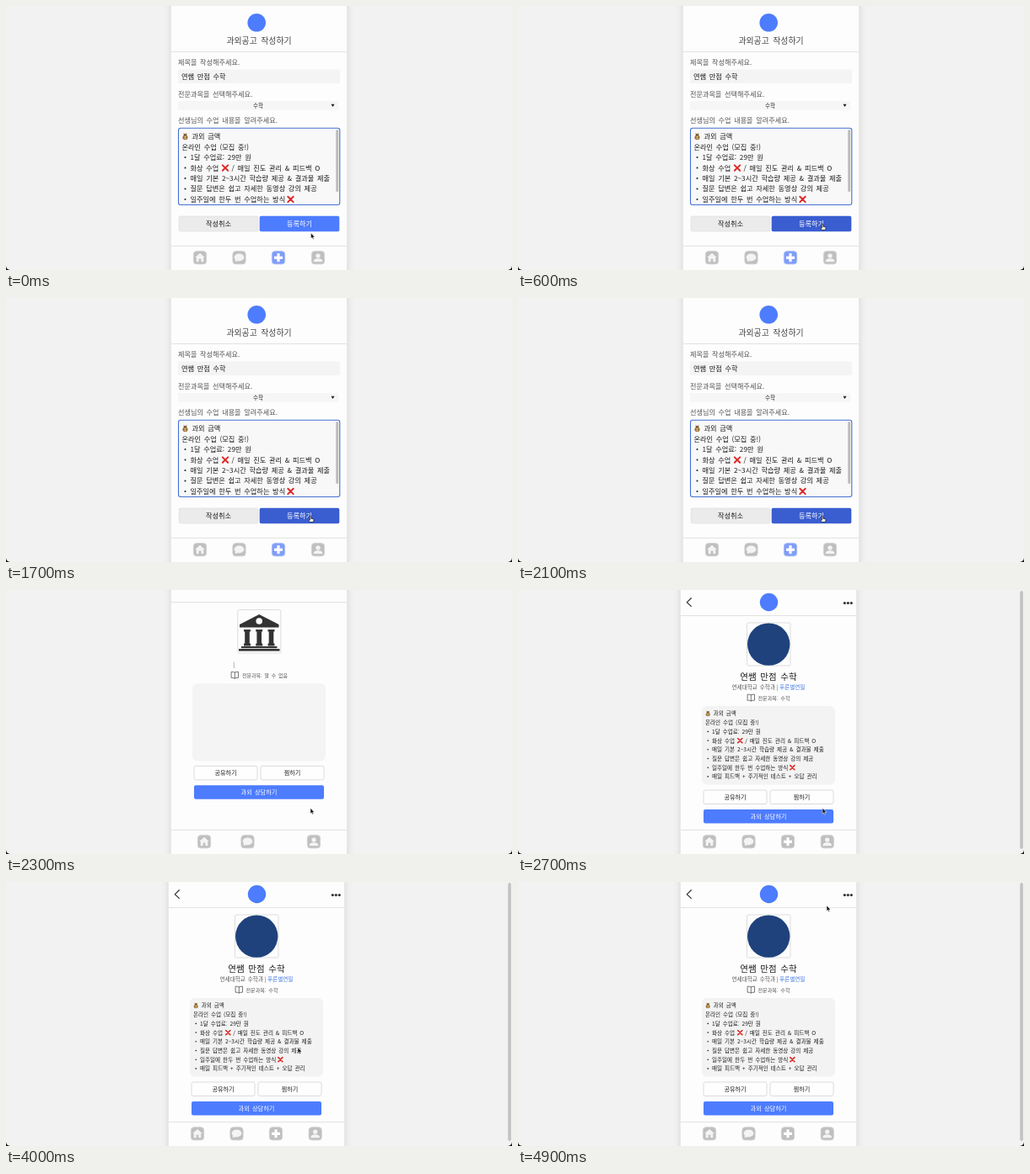
An HTML page for the animation above (5 s loop, 600 px wide and 314 px high).

```html
<!DOCTYPE html>
<html lang="ko">
<head>
<meta charset="utf-8">
<title>과외공고</title>
<style>
  html, body { margin: 0; width: 100%; height: 100%; overflow: hidden; background: #111; }
  svg { display: block; width: 600px; height: 314px; border-radius: 0 0 5px 5px; background: #f2f2f2; }
  text { font-family: "Noto Sans CJK KR", "Noto Sans CJK", "Noto Sans CJK JP", sans-serif; white-space: pre; word-spacing: .17em; }
  .panel { fill: #fdfdfd; filter: drop-shadow(0 0 4px rgba(0, 0, 0, .13)); }
</style>
</head>
<body>
<svg id="stage" viewBox="0 0 600 314" xmlns="http://www.w3.org/2000/svg"></svg>
<script>
const LOOP = 5000, HOVER_AT = 200, BLANK_AT = 2200, LOADED_AT = 2600;
const BLUE = '#4d7cfe', BLUE_HOVER = '#3a5dd0', INK = '#1c1c1c', GREY = '#555';

// Cursor tip: time, x, y
const PATH = [
  [0, 361.5, 270], [199, 361.5, 270], [200, 361, 259.5], [3000, 361, 259.5],
  [3700, 346, 197], [4100, 346, 197], [4600, 379, 204], [4700, 379, 204],
  [4800, 374, 100], [4900, 366, 28], [5000, 366, 28]
];

const rect = (x, y, w, h, fill, r = 0, stroke = 'none', sw = 1) =>
  `<rect x="${x}" y="${y}" width="${w}" height="${h}" rx="${r}" fill="${fill}" stroke="${stroke}" stroke-width="${sw}"/>`;
const path = (d, fill, stroke = 'none', sw = 1) =>
  `<path d="${d}" fill="${fill}" stroke="${stroke}" stroke-width="${sw}" stroke-linejoin="round" stroke-linecap="round"/>`;
const circle = (x, y, r, fill) => `<circle cx="${x}" cy="${y}" r="${r}" fill="${fill}"/>`;
const at = (x, y, body, scale = 1) => `<g transform="translate(${x} ${y}) scale(${scale})">${body}</g>`;
const group = (id, body) => `<g id="${id}">${body}</g>`;

// y is the middle of the line
function text(x, y, size, str, fill = INK, anchor = 'start', weight = fill === INK ? 500 : 400) {
  const safe = str.replace('&', '&amp;');
  return `<text x="${x}" y="${y + size * 0.37}" font-size="${size}" fill="${fill}" text-anchor="${anchor}" font-weight="${weight}">${safe}</text>`;
}
const mid = (x, y, size, str, fill, weight) => text(x, y, size, str, fill, 'middle', weight);
const rule = (x, y) => rect(x, y, 208, 1, '#e2e2e2');
const panel = x => `<rect class="panel" x="${x}" y="-8" width="208.3" height="330"/>`;

function button(x, y, w, h, label, fill, color, size, stroke = 'none') {
  return rect(x, y, w, h, fill, 2, stroke, 0.8) + mid(x + w / 2, y + h / 2, size, label, color);
}

const cross = path('M-3.2-3.2L3.2 3.2M3.2-3.2L-3.2 3.2', 'none', '#dd2a26', 2);
const moneyBag =
  path('M-1.4-1.6C-4 .2-3.8 4 0 4S4 .2 1.4-1.6L2.3-4L0-3.3L-2.3-4Z', '#937044') +
  rect(-1.7, -2.1, 3.4, 0.9, '#5c4222') +
  path('M1-.2Q-1.2-.8-1 .6Q1.4 1 1 2.2Q-.4 3-1.2 2.2M0-.8V3.2', 'none', '#e6c465', 0.6);
const book = path('M0-3.2Q-1.4-4-4.2-3.8V3.2Q-1.4 3 0 4Q1.4 3 4.2 3.2V-3.8Q1.4-4 0-3.2V4', 'none', '#555', 0.8);

const PALE = '#f4f4f4';
const glyphs = {
  home: path('M0-5.4L5.8-.3H4.3V5H1.3V1.5H-1.3V5H-4.3V-.3H-5.8Z', PALE),
  chat: '<ellipse cx="0" cy="-.4" rx="5.8" ry="4.5" fill="#f4f4f4"/>' + path('M-4.4 1.5L-4.8 5L-1 3.6Z', PALE),
  plus: path('M-1.6-5H1.6V-1.6H5V1.6H1.6V5H-1.6V1.6H-5V-1.6H-1.6Z', '#fff'),
  person: circle(0, -2.2, 2.7, PALE) + path('M-5.4 5Q-5.4 1 0 1T5.4 5Z', PALE)
};
const navIcon = (name, x, fill = '#bfbfbf', edge = '#d2d2d2') =>
  at(x, 299.3, rect(-7.6, -7.6, 15.2, 15.2, fill, 3.5, edge) + glyphs[name]);
const nav = (x0, items) => rule(x0, 285) + items.map(i => navIcon(...i)).join('');

// Lesson notes; the same block is set at two sizes
function notes(x, y, size, pitch, indent, count) {
  const k = size / 8.2;
  const bullets = [
    '1달 수업료: 29만 원', null,
    '매일 기본 2~3시간 학습량 제공 & 결과물 제출',
    '질문 답변은 쉽고 자세한 동영상 강의 제공',
    '일주일에 한두 번 수업하는 방식',
    '매일 피드백 + 주기적인 테스트 + 오답 관리'
  ].slice(0, count);
  const left = x + indent;
  let out = at(x + 4 * k, y, moneyBag, k) + text(x + 12 * k, y, size, '과외 금액') +
    text(x, y + pitch, size, '온라인 수업 (모집 중!)');
  bullets.forEach((line, i) => {
    const cy = y + pitch * (i + 2);
    out += circle(x + 4 * k, cy, k, INK);
    if (line) out += text(left, cy, size, line);
    else out += text(left, cy, size, '화상 수업') + at(left + 41.5 * k, cy, cross, k) +
      text(left + 49 * k, cy, size, '/ 매일 진도 관리 & 피드백 O');
    if (i === 4) out += at(left + 119 * k, cy, cross, k);
  });
  return out;
}

function form() {
  return panel(195.8) + circle(297.2, 19.8, 10.8, BLUE) +
    mid(300, 41, 9.9, '과외공고 작성하기', '#444') + rule(196, 54) +
    text(204, 67.2, 8.15, '제목을 작성해주세요.', GREY) +
    rect(204, 75.5, 192, 16.5, '#f4f4f4', 1.5) + text(208, 84, 8.2, '연쌤 만점 수학') +
    text(204, 104.5, 8.15, '전문과목을 선택해주세요.', GREY) +
    rect(204, 113, 190, 10.5, '#f6f6f6', 1) + mid(299, 118.2, 6.5, '수학') +
    path('M385.5 116.8H389.5L387.5 120Z', INK) +
    text(204, 136, 8.15, '선생님의 수업 내용을 알려주세요.', GREY) +
    rect(204.5, 145.2, 191.3, 91.3, '#f8f8f8', 2.5, '#4471d2', 1.1) +
    rect(391.2, 147, 3, 74, '#bdbdbd', 1.5) +
    notes(208.5, 155.2, 8.2, 12.45, 10, 5) +
    button(205, 250, 94, 18, '작성취소', '#ebebeb', INK, 8.2, '#e2e2e2') +
    group('submit', button(300.7, 249.7, 94.6, 18.5, '등록하기', 'inherit', '#fff', 8.2)) +
    nav(196, [['home', 230], ['chat', 276.5], ['plus', 323, '#7f9df8', '#a9bdf8'], ['person', 370]]);
}

const actions = (x, y) =>
  button(x, y, 75, 16.5, '공유하기', '#fefefe', INK, 7.1, '#d4d4d4') +
  button(x + 79, y, 75, 16.5, '찜하기', '#fefefe', INK, 7.1, '#d4d4d4') +
  button(x, y + 23, 154, 16.5, '과외 상담하기', BLUE, '#fff', 7.2);

function building() {
  const column = x => rect(x - 4, 47, 8, 2.6, '#333', 0.5) + rect(x - 2.8, 49, 5.6, 15, '#333') +
    rect(x - 4, 63.5, 8, 3, '#333', 0.5);
  return rect(274.8, 23.5, 51, 51.5, '#fdfdfd', 1.5, '#dadada', 0.9) +
    path('M300.2 29L323.5 41V44.5H277V41Z', '#333') + circle(300.2, 37, 3.8, '#fdfdfd') +
    [286, 300.2, 314.5].map(column).join('') +
    rect(279, 67, 42.5, 2.2, '#333') + rect(276, 70, 48.5, 2.6, '#333');
}

function blank() {
  return panel(195.8) + rule(196, 14) + building() +
    mid(270.2, 89, 6.7, '|', GREY) + at(271.3, 101.2, book) +
    text(280, 102, 6, '전문과목: 알 수 없음', GREY) +
    rect(221, 111, 158, 92.5, '#f4f4f4', 6) + actions(223, 209.3) +
    nav(196, [['home', 235], ['chat', 286.5], ['person', 365]]);
}

function detail() {
  return panel(192.8) + path('M205.3 9.8L200.3 14.6L205.3 19.4', 'none', '#333', 1.3) +
    circle(297.5, 14.5, 10.7, BLUE) +
    [387.3, 391.3, 395.3].map(x => circle(x, 15.5, 1.6, '#333')).join('') + rule(193, 30) +
    rect(271.5, 39, 51.5, 51, '#fdfdfd', 1.5, '#dadada', 0.9) + circle(297.2, 64.6, 25.2, '#1f427c') +
    mid(297, 102.8, 10.5, '연쌤 만점 수학') +
    text(253.5, 115.8, 6.6, '연세대학교 수학과', GREY) + mid(307.3, 115.5, 6.7, '|', GREY) +
    text(310, 115.8, 6.6, '푸른별연필', '#3f76e8') +
    at(276.3, 128, book) + text(284.5, 128.5, 6.1, '전문과목: 수학', GREY) +
    rect(218, 138, 158, 93.5, '#f3f3f3', 6) +
    notes(222, 147, 6.57, 10.7, 8, 6) + actions(220, 238) +
    nav(193, [['home', 227], ['chat', 273.5], ['plus', 320], ['person', 366.7]]) +
    rect(595.3, 1, 3.6, 307, '#c2c2c2', 1.8);
}

const arrow = path('M0 0V6.6L1.5 5.3L2.5 7.6L3.6 7.1L2.6 4.9H4.6Z', '#111', '#fff', 0.5);
const hand = path('M-.8 0Q0-.8 .7 0V2.8L3.6 3.4Q4.2 3.6 4 4.6L3.4 7H-.2L-2.4 4.5Q-2.2 3.4-.8 4.4Z', '#fff', '#111', 0.7);

const stage = document.getElementById('stage');
stage.innerHTML = group('form', form()) + group('blank', blank()) + group('detail', detail()) +
  group('cursor', group('arrow', arrow) + group('hand', hand));
const el = id => document.getElementById(id);
const show = (id, on) => el(id).setAttribute('display', on ? 'inline' : 'none');

function cursorAt(t) {
  const i = PATH.findIndex(p => p[0] > t);
  const [t0, x0, y0] = PATH[i - 1], [t1, x1, y1] = PATH[i];
  const u = (t - t0) / (t1 - t0);
  return [x0 + (x1 - x0) * u, y0 + (y1 - y0) * u];
}

function draw() {
  const t = Math.floor((performance.now() % LOOP) / 100) * 100;
  const onForm = t < BLANK_AT, hover = onForm && t >= HOVER_AT;
  show('form', onForm);
  show('blank', !onForm && t < LOADED_AT);
  show('detail', t >= LOADED_AT);
  show('hand', hover);
  show('arrow', !hover);
  el('submit').firstChild.setAttribute('fill', hover ? BLUE_HOVER : BLUE);
  el('cursor').setAttribute('transform', `translate(${cursorAt(t).join(' ')})`);
  requestAnimationFrame(draw);
}
draw();
</script>
</body>
</html>
```
